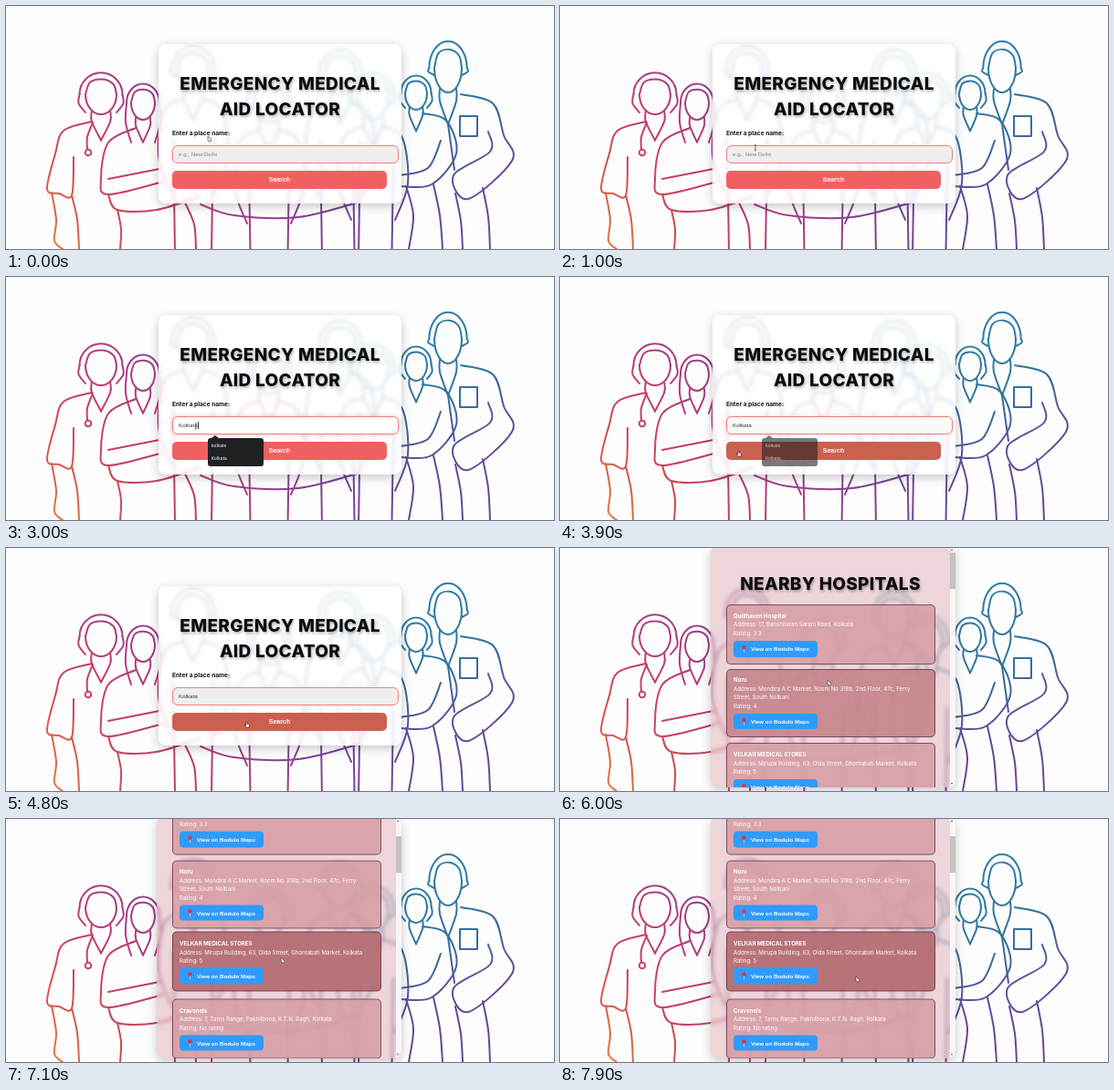
An HTML page with a canvas for the animation above (8 s loop, 600 by 267 pixels).

```html
<!DOCTYPE html>
<html lang="en">
<head>
<meta charset="utf-8">
<title>Emergency Medical Aid Locator</title>
<style>
html, body { margin: 0; width: 100%; height: 100%; overflow: hidden; background: #fefdfe; }
#stage { position: relative; width: 600px; height: 267px; overflow: hidden; font-family: Inter, sans-serif; }
#stage * { box-sizing: border-box; }
#stage div, #stage svg, canvas { position: absolute; }
#stage div { white-space: pre; }
.panel { border-radius: 8px; box-shadow: 0 3px 11px rgba(0,0,0,.22); }
#form { left: 167px; top: 42px; width: 266px; height: 175px; background: rgba(255,255,255,.8);
  backdrop-filter: blur(2px); }
h1 { position: absolute; left: 0; margin: 0; width: 100%; text-align: center; color: #0c0c0c;
  font: 800 19px/28px Inter, sans-serif; letter-spacing: .3px; white-space: pre;
  text-shadow: 1px 1.5px 3px rgba(0,0,0,.3); }
#label { left: 15px; top: 93.4px; font-size: 6.6px; line-height: 10px; font-weight: 700; color: #111; }
#input { left: 15px; top: 111px; width: 248px; height: 20px; border: 1px solid #ee7f79; border-radius: 6px;
  font: 6.2px/18px "Liberation Sans", Arial, sans-serif; padding-left: 6px; }
#caret { top: 5px; width: 1px; height: 8px; background: #333; }
#search { left: 15px; top: 139px; width: 235px; height: 20px; border-radius: 5px; color: #fff; text-align: center;
  font: 700 7px/20px "Liberation Sans", Arial, sans-serif; }
#popup { left: 221px; top: 177px; width: 61px; height: 31px; border-radius: 3px; background: #1f2023; color: #f2f2f2;
  font: 5px/14px Roboto, sans-serif; padding: 1px 0 0 4px; }
#popup::before { content: ""; position: absolute; left: 4px; top: -3px; border: 4px solid transparent;
  border-top: 0; border-bottom: 3px solid #1f2023; }
#results { left: 165px; top: -2px; width: 268px; height: 265px; overflow: hidden;
  background: rgba(222,180,186,.55); backdrop-filter: blur(2px); }
#list { left: 0; top: 2px; width: 262px; height: 400px; }
.place { left: 17px; width: 229px; border: 1px solid rgba(90,42,60,.7); border-radius: 5px; color: #fff;
  font-size: 6.1px; line-height: 9.4px; padding: 6.8px 0 0 7px; }
.place b { font-weight: 700; }
.map { left: 7px; bottom: 7.5px; width: 91.5px; height: 17.5px; border-radius: 4px; background: #309bfb;
  font: 700 6.2px/17.5px "Liberation Sans", Arial, sans-serif; padding-left: 19px; }
.map svg { left: 8px; top: 4px; }
#bar { right: 0; top: 0; width: 6.5px; height: 100%; background: #f8f7f8; }
#thumb { left: .5px; width: 5.5px; height: 40px; background: #c3c2c3; }
.tri { left: 1.5px; border: 1.7px solid transparent; }
#up { top: 3px; border-top: 0; border-bottom: 2.2px solid #555; }
#down { bottom: 3px; border-bottom: 0; border-top: 2.2px solid #555; }
</style>
</head>
<body>
<div id="stage">
  <canvas id="art" width="600" height="267"></canvas>
  <div id="form" class="panel">
    <h1 style="top:30px">EMERGENCY MEDICAL
AID LOCATOR</h1>
    <div id="label">Enter a place name:</div>
    <div id="input"><span id="value"></span><div id="caret"></div></div>
    <div id="search">Search</div>
  </div>
  <div id="popup">kolkate
Kolkata</div>
  <div id="results" class="panel">
    <div id="list"><h1 style="top:26px">NEARBY HOSPITALS</h1></div>
    <div id="bar"><div id="up" class="tri"></div><div id="thumb"></div><div id="down" class="tri"></div></div>
  </div>
  <svg id="cursor" width="10" height="10" viewBox="-5 -5 10 10" stroke-linejoin="round">
    <path id="arrow" d="M-2-3V2L1 3 2 1Z" fill="#eee" stroke="#333" stroke-width=".6"/>
    <path id="beam" d="M-1-3H1M0-3V3M-1 3H1" fill="none" stroke="#333" stroke-width=".7"/>
    <path id="hand" d="M-1-3H0V-1L2.5 0 2 3H-1L-3 0-1 1Z" fill="#fff" stroke="#222" stroke-width=".6"/>
  </svg>
</div>
<script>
const $ = id => document.getElementById(id);
const LOOP = 8000, RESULTS_AT = 5600, WORD = "Kolkata";

const clamp = x => Math.min(1, Math.max(0, x));
const ease = x => x * x * (3 - 2 * x);
const ramp = (t, from, to) => ease(clamp((t - from) / (to - from)));
const mix = (a, b, k) => "rgba(" + a.map((v, i) => v + (b[i] - v) * k).join() + ")";

const ctx = $("art").getContext("2d");

// Smooth line through a few points
function line(...p) {
  const n = p.length / 2;
  const at = i => { const j = Math.min(n - 1, Math.max(0, i)); return [p[2 * j], p[2 * j + 1]]; };
  ctx.beginPath();
  ctx.moveTo(p[0], p[1]);
  for (let i = 0; i < n - 1; i++) {
    const [a, b, c, d] = [at(i - 1), at(i), at(i + 1), at(i + 2)];
    ctx.bezierCurveTo(b[0] + (c[0] - a[0]) / 6, b[1] + (c[1] - a[1]) / 6,
      c[0] - (d[0] - b[0]) / 6, c[1] - (d[1] - b[1]) / 6, c[0], c[1]);
  }
  ctx.stroke();
}

function arc(x, y, w, h, from, to) {
  ctx.beginPath();
  ctx.ellipse(x, y, w, h, 0, from, to);
  ctx.stroke();
}

// Blank face, fringe, hair reaching down by `hair`, neck and collar
function head(x, y, w, h, hair) {
  arc(x, y, w, h, 0, Math.PI);
  line(x - w, y, x - w * .7, y - h * .6, x + w * .1, y - h * .75, x + w * .8, y - h * .5, x + w, y);
  arc(x, y, w * 1.38, h * 1.08, Math.PI, 0);
  for (const side of [-1, 1]) {
    const edge = x + side * w * 1.38, neck = x + side * w * .6;
    line(edge, y, edge + side, y + hair / 2, x + side * w, y + hair);
    line(neck, y + h * .85, neck, y + h * 1.35, x, y + h * 2.3);
  }
}

function bystander(x, y) {
  head(x, y, 17, 24, 8);
  for (const side of [-1, 1]) {
    line(x + side * 10, y + 32, x + side * 32, y + 45, x + side * 38, y + 95, x + side * 24, y + 135);
    line(x + side * 22, y + 75, x + side * 20, y + 200);
  }
}

function nurse() {
  head(104, 97, 17, 22, 20);
  line(94, 127, 63, 137, 54, 162, 45, 201, 58, 206, 72, 208, 74, 166);
  line(72, 208, 78, 235, 80, 267);
  line(50, 205, 55, 235, 53, 258, 62, 267);
  line(95, 128, 89, 144, 89, 157);
  arc(90, 161, 3.3, 3.3, 0, 7);
}

function doctor() {
  head(150, 106, 13, 19, 44);
  line(142, 134, 112, 150, 104, 190, 112, 207, 172, 193);
  line(112, 190, 168, 179);
  line(112, 207, 122, 224, 165, 224, 212, 209);
  line(122, 224, 126, 245, 125, 267);
  line(196, 216, 206, 240, 208, 267);
}

function middleGroup() {
  bystander(205, 70);
  bystander(288, 104);
  bystander(366, 74);
  bystander(402, 100);
  line(213, 218, 250, 230, 320, 232, 388, 215);
}

function aide() {
  head(449, 96, 12, 18, 16);
  line(456, 118, 482, 126, 493, 162, 466, 196, 432, 198);
  line(476, 148, 462, 178, 432, 186);
  line(438, 198, 446, 230, 441, 267);
  line(468, 196, 475, 230, 478, 267);
}

function consultant() {
  head(484, 68, 15, 27, 8);
  line(498, 97, 533, 107, 545, 142, 554, 170, 506, 212, 490, 186, 530, 160, 528, 138);
  line(522, 200, 528, 232, 530, 267);
  line(484, 130, 491, 180);
  line(492, 206, 498, 236, 500, 267);
  ctx.strokeRect(497, 121, 19, 22);
}

function tint(gradient, colors) {
  colors.forEach((c, i) => gradient.addColorStop(i / (colors.length - 1), c));
  ctx.fillStyle = gradient;
  ctx.fillRect(0, 0, 600, 267);
}

function drawArt() {
  ctx.lineWidth = 2;
  ctx.lineCap = ctx.lineJoin = "round";
  [nurse, doctor, middleGroup, aide, consultant].forEach(draw => draw());
  ctx.globalCompositeOperation = "source-atop";
  tint(ctx.createLinearGradient(50, 265, 300, 60),
    ["#e47a44", "#d14a50", "#bd3c70", "#96408c", "#784394", "#644a98"]);
  tint(ctx.createRadialGradient(445, 30, 30, 445, 30, 180), ["#2b7fa4", "#30749f", "#30749f00"]);
}

const PLACES = [
  ["Quillhaven Hospital", "Address: 17, Banshitaran Sarani Road, Kolkata", "Rating: 3.3"],
  ["Noru", "Address: Mondira A C Market, Room No 318b, 2nd Floor, 47c, Ferry", "Street, South Nolbani", "Rating: 4"],
  ["VELKAR MEDICAL STORES", "Address: Mirupa Building, 63, Olda Street, Ghontabati Market, Kolkata", "Rating: 5"],
  ["Cravonels", "Address: 7, Tarns Range, Pakhilbona, K.T.N. Bagh, Kolkata", "Rating: No rating"]
];
const PIN = '<svg width="7" height="10"><path d="M3.5 4V9" stroke="#b9c4d0"/><circle cx="3.5" cy="3" r="2.3" fill="#e0313c"/></svg>';

let nextTop = 62;
const cards = PLACES.map(([name, ...lines]) => {
  const card = document.createElement("div");
  const height = 47.2 + 9.4 * lines.length;
  card.className = "place";
  card.style.top = nextTop + "px";
  card.style.height = height + "px";
  card.innerHTML = `<b>${name}</b>\n${lines.join("\n")}<div class="map">${PIN}View on Bodulo Maps</div>`;
  $("list").append(card);
  nextTop += height + 5.5;
  return card;
});

// Pointer moves after its start at (223, 146)
const MOVES = [
  { from: 700, to: 1200, x: 209, y: 161 },
  { from: 2900, to: 3450, x: 196, y: 194 },
  { from: 4000, to: 4600, x: 264, y: 194 },
  { from: 5600, to: 5900, x: 295, y: 148 },
  { from: 6900, to: 7500, x: 326, y: 176 }
];

function pointer(t) {
  let x = 223, y = 146;
  for (const m of MOVES) {
    const k = ramp(t, m.from, m.to);
    x += (m.x - x) * k;
    y += (m.y - y) * k;
  }
  return [x, y];
}

const show = (id, on) => { $(id).style.display = on ? "" : "none"; };

function drawForm(t) {
  const focus = ramp(t, 1150, 1400) - ramp(t, 3800, 4050);
  const typed = WORD.slice(0, Math.max(0, Math.floor((t - 1350) / 150)));
  $("value").textContent = typed || "e.g., New Delhi";
  $("value").style.color = typed ? "#333" : "#85858a";
  $("input").style.background = mix([238, 238, 238, 1], [255, 255, 255, 1], focus);
  $("input").style.boxShadow = `0 0 4px rgba(240,90,80,${.45 * focus})`;
  const typing = t > 1500 && t < 2700;
  show("caret", t > 1150 && t < 3800 && (typing || t % 1000 < 500));
  $("caret").style.left = 6 + (typed ? $("value").offsetWidth : 0) + "px";
  $("search").style.background = mix([241, 96, 97, 1], [204, 96, 78, 1], ramp(t, 3250, 3500));
  $("popup").style.opacity = t < 1500 ? 0 : 1 - clamp((t - 3800) / 250);
}

function drawResults(t) {
  const scroll = ramp(t, 6100, 6420);
  const swap = ramp(t, 6650, 6950);
  const hover = [0, ramp(t, 5850, 6150) - swap, swap, 0];
  $("list").style.transform = `translateY(${-88.5 * scroll}px)`;
  $("thumb").style.top = 7 + 13.5 * scroll + "px";
  cards.forEach((card, i) => {
    card.style.background = mix([214, 158, 165, .88], [180, 108, 115, .93], hover[i]);
    card.style.transform = `translateY(${-2 * hover[i]}px)`;
  });
}

function render(t) {
  const [x, y] = pointer(t);
  const done = t >= RESULTS_AT;
  show("form", !done);
  show("popup", !done);
  show("results", done);
  if (done) drawResults(t); else drawForm(t);

  const inside = (top, bottom) => !done && y > top && y < bottom;
  const shape = inside(153, 173) ? "beam" : inside(181, 201) ? "hand" : "arrow";
  ["arrow", "beam", "hand"].forEach(id => show(id, id === shape));
  $("cursor").style.transform = `translate(${x - 5}px,${y - 5}px)`;
}

drawArt();
const start = performance.now();
function tick(now) {
  render(Math.max(0, now - start) % LOOP);
  requestAnimationFrame(tick);
}
render(0);
requestAnimationFrame(tick);
</script>
</body>
</html>
```
